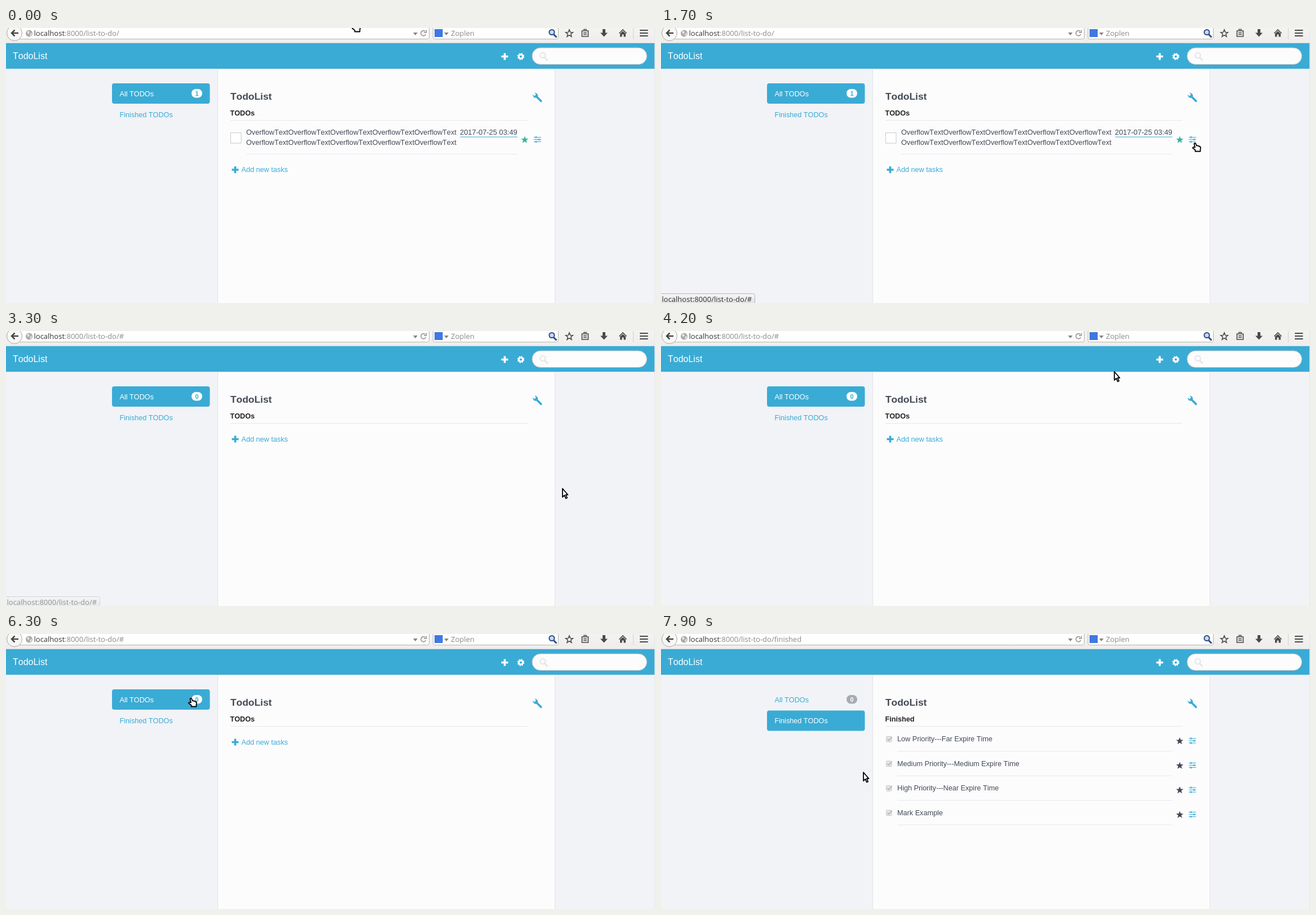
Recreate the animation shown at these times as an HTML page. Size 1151 by 487 pixels, loop 8000 ms.

```html
<!DOCTYPE html>
<html lang="en">
<head>
<meta charset="utf-8">
<title>TodoList</title>
<style>
  html, body { margin: 0; width: 100%; height: 100%; overflow: hidden; background: #f1f3f7 }
  svg { display: block; font: 12.67px "Liberation Sans", Arial, sans-serif; font-kerning: none }
  .ui { font: 13px "Open Sans", "Noto Sans", sans-serif }
  .b { font-weight: bold }
  .blue { fill: #3aabd5 }
  .ink { fill: #434a54 }
  .ln { fill: none; stroke: #e7e8ea }
</style>
</head>
<body>
<svg id="stage" width="1151" height="487" viewBox="0 0 1151 487">
  <defs>
    <linearGradient id="bar" x2="0" y2="1"><stop stop-color="#f4f3f2"/><stop offset="1" stop-color="#efedeb"/></linearGradient>
    <linearGradient id="tip" x2="0" y2="1"><stop stop-color="#f7f7f7"/><stop offset="1" stop-color="#dcdcdc"/></linearGradient>
    <filter id="shade" x="-20%" y="-20%" width="140%" height="150%"><feDropShadow dx="0" dy="3" stdDeviation="4" flood-opacity=".25"/></filter>
    <path id="star" d="M0-6.6 1.8-2.1 6.4-1.9 2.8 1.1 4 5.700 0 3.100-4 5.700-2.800 1.100-6.400-1.900-1.800-2.100Z"/>
    <g id="sliders" fill="#fcfcfd" stroke="#3aabd5" stroke-width="1.2">
      <path d="M-6.500-4H6.500M-6.500 0H6.500M-6.500 4H6.500"/>
      <circle cx="-2.500" cy="-4" r="1.100"/><circle cx="3" r="1.100"/><circle cx="-2.500" cy="4" r="1.100"/>
    </g>
    <path id="plus" d="M-1.800-6H1.800V-1.800H6V1.800H1.800V6H-1.800V1.800H-6V-1.800H-1.800Z"/>
    <g id="tick">
      <rect x="399.500" y="181.500" width="9.500" height="9.500" rx="1.500" fill="#e6e6e6" stroke="#c6c6c6"/>
      <path d="M401.500 186 404 188.500 409.500 182.500" fill="none" stroke="#adadad" stroke-width="1.500"/>
    </g>
  </defs>

  <!-- page -->
  <rect width="1151" height="487" fill="#f1f3f7"/>
  <rect x="375.500" y="60" width="598" height="440" fill="#fcfcfd" stroke="#e2e4e8"/>
  <rect y="72" width="1151" height="1" fill="#cfe3ee"/>
  <rect class="blue" y="26.500" width="1151" height="45.500"/>
  <text x="12" y="55" font-size="16" fill="#fff">TodoList</text>
  <use href="#plus" x="884.500" y="50.500" fill="#fff"/>
  <g transform="translate(913 50.500)" fill="none" stroke="#fff">
    <circle r="3.600" stroke-width="3"/><circle r="5.300" stroke-width="2" stroke-dasharray="2.200 1.963"/>
  </g>
  <rect x="933" y="35" width="203.500" height="29.500" rx="14.750" fill="#fcfcfd" stroke="#b5bcc0"/>
  <path d="M956 53 960 57" stroke="#e3e4e6" stroke-width="2.500" stroke-linecap="round"/>
  <circle cx="952" cy="48.500" r="4.700" fill="none" stroke="#e3e4e6" stroke-width="2"/>

  <!-- browser bar -->
  <rect width="1151" height="26.500" fill="url(#bar)"/>
  <path d="M22-2H750.500V16.500Q750.500 19.500 747.500 19.500H24M757.500-2V16.500Q757.500 19.500 760.500 19.500H976.500Q979.500 19.500 979.500 16.500V-2" fill="#fff" stroke="#b9b4ae"/>
  <circle cx="15" cy="9" r="13.500" fill="#f8f7f6" stroke="#aaa6a1"/>
  <path d="M22 9H11M15.500 3.500 10 9 15.500 14.500" fill="none" stroke="#474747" stroke-width="2.500"/>
  <circle cx="41" cy="9.500" r="6" fill="#aaa"/>
  <path d="M37 6 40 5 42 8 39 11ZM43 10 46 8 45 13 42 14Z" fill="#e6e6e6"/>
  <text class="ui" x="49.500" y="14" fill="#333">localhost<tspan id="path" fill="#8a8a8a"></tspan></text>
  <path d="M722 8H730L726 13ZM777 8H785L781 13Z" fill="#858585"/>
  <g id="reload" fill="none" stroke="#8d8d8d" stroke-width="1.500"><path d="M743.500 6A4.500 4.500 0 1 0 744.500 11M745.500 3.500V8H741"/></g>
  <path id="stop" d="M737 5.500 744 12.500M744 5.500 737 12.500" stroke="#b87850" stroke-width="2.600"/>
  <rect x="760" y="2" width="14.500" height="14" fill="#3f78e0"/>
  <text class="ui" x="789" y="14" fill="#8a8a8a">Zoplen</text>
  <g fill="none" stroke="#4b4b4b" stroke-width="1.700">
    <path d="M971.500 11.500 976.500 16.500" stroke="#2c4c86" stroke-width="3"/>
    <circle cx="968" cy="7.500" r="4.600" fill="#c9daf0" stroke="#2c4c86" stroke-width="2"/>
    <use href="#star" x="999" y="9.500" stroke-width="1.500"/>
    <path d="M1021.500 5H1032.500V15H1021.500ZM1025 4V2.500H1029V4M1024 8.500H1030M1024 11.500H1030"/>
    <path d="M1087.500 9.500 1094 3 1100.500 9.500"/>
    <path d="M1112.500 0V20" stroke="#d5d2ce" stroke-width="1"/>
    <path d="M1124 4H1138.500M1124 9H1138.500M1124 14H1138.500" stroke-width="2.200"/>
  </g>
  <path d="M1058 2H1063V8.500H1067L1060.500 15.500 1054 8.500H1058ZM1089 10 1094 5.500 1099 10V15.500H1095.500V11.500H1092.500V15.500H1089Z" fill="#4b4b4b"/>

  <!-- sidebar -->
  <rect id="hover" x="188" y="136" width="173.500" height="35.500" rx="4" fill="#eee"/>
  <rect id="tab" class="blue" x="188" width="173.500" height="36" rx="4"/>
  <text id="all" x="201.500" y="121">All TODOs</text>
  <text id="done" x="201.500" y="158">Finished TODOs</text>
  <rect id="badge" x="329" y="108" width="19" height="15.500" rx="7.750"/>
  <text id="count" class="b" x="338.500" y="119.500" font-size="11" text-anchor="middle"></text>

  <!-- content -->
  <text class="b ink" x="398" y="127" font-size="17.400">TodoList</text>
  <g transform="translate(942.500 123) rotate(45)" class="blue">
    <path d="M-9.500-2.200H-5.500V2.200H-9.500A5.300 5.300 0 0 0-.8 1.800H9A1.800 1.800 0 0 0 9-1.800H-.8A5.300 5.300 0 0 0-9.500-2.200Z"/>
  </g>
  <text id="title" class="b" x="397.500" y="154.500" fill="#222"></text>
  <path class="ln" d="M398 163.500H925"/>
  <g id="add" class="blue">
    <use href="#plus" x="406.500" y="251"/><text x="417.500" y="255">Add new tasks</text>
  </g>
  <g id="task" class="ink">
    <rect x="398.500" y="185.500" width="18.500" height="18.500" fill="#fff" stroke="#c6c8ca"/>
    <text id="long1" x="426" y="189"></text>
    <text id="long2" x="426" y="207"></text>
    <text x="805" y="189" font-size="12.900">2017-07-25 03:49</text>
    <path d="M805.500 193H907" stroke="#3aabd5" stroke-width="1.200"/>
    <path class="ln" d="M426.500 223.500H907"/>
    <use href="#star" x="920" y="198" fill="#37b79b"/>
    <use href="#sliders" x="942.500" y="197.500"/>
  </g>
  <g id="list" class="ink"></g>
  <g id="menu" fill="#fff">
    <rect x="931.500" y="208" width="142.500" height="79" rx="4" fill="#434751" filter="url(#shade)"/>
    <path d="M932 247.500H1074" stroke="#686b74"/>
    <text x="949.500" y="230.500">Edit</text><text x="949.500" y="273.500">Delete</text>
  </g>

  <g id="status">
    <rect id="panel" x="-3" y="470.500" height="22" rx="3" fill="url(#tip)" stroke="#b5b5b5"/>
    <text id="note" class="ui" x="1.500" y="485" fill="#333"></text>
  </g>
  <path d="M1150.500 0V487" stroke="#e4e6ea"/>
  <path id="cursor" fill="#fff" stroke="#000" stroke-width="1.800" stroke-linejoin="round"/>
</svg>
<script>
const $ = id => document.getElementById(id);
const show = (id, on) => $(id).style.display = on ? "" : "none";
const set = (id, attrs) => { for (const k in attrs) $(id).setAttribute(k, attrs[k]); };
const within = (t, a, b) => t >= a && t < b;

const BLUE = "#3aabd5", WHITE = "#fff";
const ARROW = "M1 1V16L4.500 12.800 6.800 18.500 9.200 17.500 6.800 12H10.500Z";
const HAND = "M-1.500 2Q-.5 0 1.500 2L2.800 5.500Q4.500 4.500 5.500 6 7 5 8 7 10 7 10 9.500L9.500 12V15.500H.5V13L-4 9.500Q-4 7 0 8.500Z";

// time, x and y of the pointer's hot spot
const MOVES = [
  [100, 618, -9], [600, 800, 140], [1000, 951, 253], [1100, 951, 245], [1400, 956, 202],
  [1500, 956, 202], [1600, 943, 202], [1700, 947, 203], [2000, 947, 203], [2400, 947, 294],
  [2600, 953, 284], [2900, 957, 266], [3000, 960, 267], [3300, 986, 278], [3500, 986, 278],
  [4400, 751, 12], [5700, 751, 12], [6300, 328, 113], [6500, 318, 198], [6600, 312, 158],
  [6800, 306, 156], [7300, 306, 156], [7900, 358, 244]
];
const HAND_TIMES = [[0, 300], [1300, 2200], [2700, 3100], [4400, 5800], [6200, 6400], [6600, 7400]];

const overflow = "OverflowText".repeat(5);
$("long1").textContent = $("long2").textContent = overflow;
$("list").innerHTML = [
  "Low Priority---Far Expire Time", "Medium Priority---Medium Expire Time",
  "High Priority---Near Expire Time", "Mark Example"
].map((label, i) => `<g transform="translate(0 ${i * 43.5})">
  <use href="#tick"/><text x="419" y="190">${label}</text>
  <path class="ln" d="M419 207.500H907"/>
  <use href="#star" x="920" y="189.500"/><use href="#sliders" x="942.500" y="189"/></g>`).join("");

function pointer(t) {
  const i = MOVES.findIndex(m => m[0] >= t);
  if (i < 1) return MOVES[0].slice(1);
  const [t0, x0, y0] = MOVES[i - 1], [t1, x1, y1] = MOVES[i];
  const k = (t - t0) / (t1 - t0);
  return [x0 + (x1 - x0) * k, y0 + (y1 - y0) * k];
}

function status(t) {
  if (within(t, 1300, 2500) || within(t, 2700, 3400)) return ["localhost:8000/list-to-do/#", 169.5];
  if (within(t, 4700, 5200) || within(t, 7000, 7400)) return ["Waiting for localhost…", 287.5];
  if (within(t, 5200, 5300)) return ["Read localhost", 287.5];
  return null;
}

function draw(t) {
  const deleted = t >= 3000, finished = t >= 7400;
  const loading = within(t, 4700, 5300) || within(t, 7000, 7400);
  $("path").textContent = ":8000/list-to-do/" + (finished ? "finished" : deleted ? "#" : "");
  show("reload", !loading);
  show("stop", loading);

  show("hover", within(t, 6600, 7400));
  set("tab", { y: finished ? 135.5 : 98 });
  set("all", { fill: finished ? BLUE : WHITE });
  set("done", { fill: finished ? WHITE : BLUE });
  set("badge", { fill: finished ? "#a7abb2" : WHITE });
  set("count", { fill: finished ? WHITE : BLUE });
  $("count").textContent = deleted ? 0 : 1;

  $("title").textContent = finished ? "Finished" : "TODOs";
  show("task", !deleted);
  show("list", finished);
  show("add", !finished);
  set("add", { transform: `translate(0 ${deleted ? -59.5 : 0})` });
  show("menu", within(t, 2100, 3000));

  const s = status(t);
  show("status", s);
  if (s) {
    $("note").textContent = s[0];
    set("panel", { width: s[1] });
    set("status", { opacity: within(t, 3300, 3400) ? 0.5 : 1 });
  }

  const hand = HAND_TIMES.some(([a, b]) => within(t, a, b));
  set("cursor", { d: hand ? HAND : ARROW, transform: `translate(${pointer(t).map(Math.round)})` });
}

let last = -1;
function tick() {
  const t = Math.floor(performance.now() % 8000 / 100) * 100;
  if (t !== last) draw(last = t);
  requestAnimationFrame(tick);
}
tick();
</script>
</body>
</html>
```
